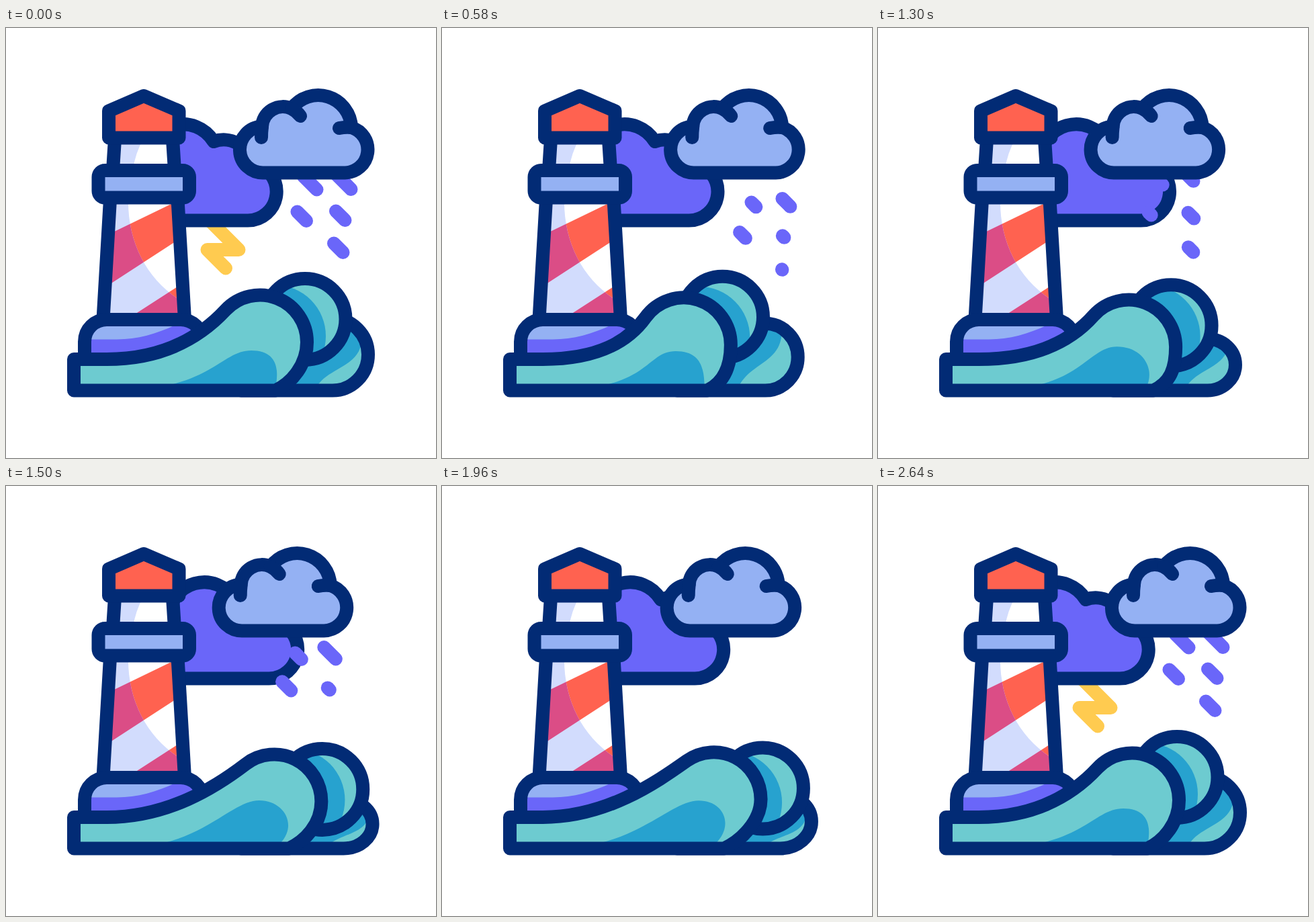
Animation, 640 px wide and 640 px high, one loop 3 s. Source, as an HTML page:

```html
<!DOCTYPE html>
<html lang="en">
<head>
<meta charset="utf-8">
<title>Lighthouse in a storm</title>
<style>
  html, body { margin: 0; width: 100%; height: 100%; overflow: hidden; background: #fff; }
  svg { display: block; width: 100%; height: 100%; }
  .ink { stroke: #022b75; }
  .ink, #bolt, #rain { stroke-width: 20; stroke-linecap: round; stroke-linejoin: round; }
  .line { fill: none; }
  .white { fill: #fff; }
  .sky { fill: #94b1f3; }
  .violet { fill: #6a66f9; }
  .teal { fill: #6dcbd0; }
  .blue { fill: #27a2cf; }
  .red { fill: #ff6250; }
  .pink { fill: #db4d86; }
  .pale { fill: #d2dcfd; }
  #bolt { fill: none; stroke: #ffcb50; }
  #rain { stroke: #6a66f9; }
</style>
</head>
<body>
<svg viewBox="0 0 640 640">
  <defs>
    <clipPath id="shadow"><path d="M182 255C181 320 210 375 262 407V440H140V255Z"/></clipPath>
    <clipPath id="tower"><path d="M155 255H255.5L266 434H144.5Z"/></clipPath>
    <clipPath id="crestClip"><circle r="60.500"/></clipPath>
    <clipPath id="swellClip"><path class="swell"/></clipPath>
    <path id="stripes" d="M156 305.500L252 259V318L152 383ZM184 431L260 382V434H184Z"/>
  </defs>

  <g id="backCloud">
    <path id="bolt" pathLength="1" d="M303 286.500L346.500 330H299.500L327 357.500"/>
    <path id="backBody" class="ink" d="M211 286.500V197A52.700 52.700 0 0 1 309 169A43 43 0 0 1 366 201A43 43 0 0 1 358 286.500Z"/>
  </g>

  <g id="rain"></g>

  <g id="frontCloud" class="ink">
    <path class="sky" d="M384 215.500A34.500 34.500 0 0 1 381 146.500A31 31 0 0 1 425 120A49.400 49.400 0 0 1 514 148A34.500 34.500 0 0 1 504.500 215.500Z"/>
    <path class="line" d="M381 147Q380 155 380 163M425 120Q433 124 438 131M514 148Q505 147 496 149"/>
  </g>

  <g id="lighthouse">
    <path class="white" d="M162 165H248L251 212H159Z"/>
    <path class="pale" d="M204 166Q193 185 189 210H159L162 166Z"/>
    <path class="ink line" d="M162 165L159 212M248 165L251 212"/>
    <path class="ink red" d="M153 123.500L205 101L257.500 123.500V163.500H153Z"/>

    <g clip-path="url(#tower)">
      <path class="white" d="M140 250H270V440H140Z"/>
      <use href="#stripes" class="red"/>
      <g clip-path="url(#shadow)">
        <path class="pale" d="M140 250H270V440H140Z"/>
        <use href="#stripes" class="pink"/>
      </g>
    </g>
    <path class="ink line" d="M155 255L144.500 434M255.500 255L266 434"/>
    <rect class="ink sky" x="137.500" y="212" width="135.500" height="40.500" rx="10"/>

    <path class="sky" d="M117 500V467C117 448 132 434 150 434H260C278 434 293 448 293 467V500Z"/>
    <path class="violet" d="M117 463.500H165C195 463.500 225 455 252 442H280L293 467V500H117Z"/>
    <path class="ink line" d="M117 500V467C117 448 132 434 150 434H260C278 434 293 448 293 467V500"/>
  </g>

  <g id="sea">
    <path class="swell teal"/>
    <path id="swellShade" class="blue" clip-path="url(#swellClip)"/>
    <path class="swell ink line"/>
    <g id="crest">
      <circle class="teal" r="60.500"/>
      <g clip-path="url(#crestClip)"><circle id="crestShade" class="blue" r="76"/></g>
      <circle class="ink line" r="60.500"/>
    </g>
    <path class="wave teal"/>
    <path id="waveShade" class="blue"/>
    <path class="wave ink line"/>
  </g>
</svg>

<script>
const LOOP = 3000;
const $ = id => document.getElementById(id);
const set = (id, attrs) => {
  for (const name in attrs) $(id).setAttribute(name, attrs[name]);
};
const setPath = (name, d) => {
  for (const path of document.querySelectorAll("." + name)) path.setAttribute("d", d);
};
const span = (t, from, length) => Math.min(1, Math.max(0, (t - from) / length));
const ease = x => (1 - Math.cos(Math.PI * x)) / 2;

// Tip of each drop and its length, in the order they fall.
const drops = [
  [501.5, 334, 13.5], [504.5, 286, 13.5], [462.5, 240.5, 20], [513.5, 240, 24], [447, 287, 13.5]
].map(([x, y, size]) => {
  const line = document.createElementNS("http://www.w3.org/2000/svg", "line");
  $("rain").append(line);
  return { x, y, size, line };
});

// Clouds slide 31.5 px, wait, and return.
const drift = (t, back) => 31.5 * (ease(span(t, 200, 1150)) - ease(span(t, back, 930)));

// The sea leans left, rolls over to the right, then settles.
// Returns a blend of the three poses, plus an extra amount in mid-roll.
function seaBlend(t) {
  const left = ease(span(t, 240, 690));
  const right = ease(span(t, 930, 790));
  const x = span(t, 1720, 920);
  const rest = 0.8 * ease(x) + 0.2 * x * (2 - x);
  const roll = Math.sin(Math.PI * right);
  return (a, b, c, extra = 0) => {
    const leaning = a + (b - a) * left + (c - b) * right;
    return leaning + (a - c) * rest + extra * roll;
  };
}

function drawWave(at) {
  const r = 70;
  const x = at(378, 341, 412), y = at(467.5, 475.5, 466, 3.4);
  const angle = at(223, 208, 238) * Math.PI / 180;
  const cos = Math.cos(angle), sin = Math.sin(angle);
  const px = x + r * cos, py = y + r * sin;
  const pull = at(47, 42, 60), end = at(401, 388, 425, 5);
  setPath("wave", `M101 539.5V493H150C${at(240, 225, 245)} 493 ${px + pull * sin} ${py - pull * cos} ${px} ${py}` +
    `A${r} ${r} 0 0 1 ${x + r} ${y}C${x + r} ${y + 33} ${end + 25} 528 ${end} 539.5Z`);

  const foot = at(225, 225, 215), heel = at(401, 380, 405, 8), bulge = at(6, -7, 40);
  const tx = at(365, 330, 387), ty = at(480, 482, 465);
  set("waveShade", {
    d: `M${foot} 535C${foot + 85} 521 ${tx - 38} ${ty} ${tx} ${ty}S${heel + bulge} 507 ${heel} 535Z`
  });
}

function drawCrest(at) {
  set("crest", { transform: `translate(${at(445, 389, 486.5, 3)} ${at(433.5, 427, 454.5, 3.4)})` });
  set("crestShade", { cx: at(-45, -25, -48, 3), cy: at(25, 36, 20, -13) });
}

function drawSwell(at) {
  const x = at(486, 476, 508), rx = at(53, 44, 45, -3), ry = at(53.5, 46, 36.5, -3.4);
  setPath("swell", `M350 539.5H${x}A${rx} ${ry} 0 0 0 ${x} ${539.5 - 2 * ry}H350Z`);
  const top = at(530, 480, 546, 12), foot = at(463, 420, 490, 8), mid = at(505, 492, 523);
  set("swellShade", {
    d: `M${top} ${at(465, 450, 498)}C${top - 5} ${mid} ${foot + 18} ${mid} ${foot} 533V540H350V420H${top}Z`
  });
}

// Drops grow out along a slant, then shrink from the tail while they fall.
function drawRain(t, shift) {
  const second = t > 1000;
  const fall = t < 2000 ? 0.083 * Math.max(0, t - (second ? 1290 : 270)) : 0;
  set("rain", { transform: `translate(${0.49 * fall - shift} ${fall})` });
  drops.forEach(({ x, y, size, line }, i) => {
    let tip = 1, tail = 0;
    if (t > 2000) tip = span(t, 2300 + 35 * i, 200);
    else if (second) {
      tip = span(t, 1120 + 30 * i, 200);
      tail = span(t, 1195 + 75 * i, 300);
    } else tail = span(t, 330 + 40 * i, 260);
    const a = size * (1 - Math.min(tail, tip)), b = size * (1 - tip);
    const ends = { x1: x - a, y1: y - a, x2: x - b, y2: y - b };
    for (const key in ends) line.setAttribute(key, ends[key]);
    line.setAttribute("visibility", tip > 0 && tail < 1 ? "visible" : "hidden");
  });
}

function drawBolt(t) {
  const flash = [820, 1580].find(at => t >= at && t < at + 260);
  let start = 0, end = 1;
  if (flash) {
    end = span(t, flash, 80);
    start = span(t, flash + 180, 80);
  } else if (t < 1200) start = span(t, 220, 120);
  else end = span(t, 2500, 120);
  const size = end - start;
  set("bolt", {
    visibility: size > 0 ? "visible" : "hidden",
    "stroke-dasharray": size >= 1 ? "none" : `${Math.max(0, size)} 2`,
    "stroke-dashoffset": -start
  });
  set("backBody", { fill: flash ? "#ffcb50" : "#6a66f9" });
}

function draw(t) {
  const front = drift(t, 1450);
  set("frontCloud", { transform: `translate(${-front} 0)` });
  set("backCloud", { transform: `translate(${drift(t, 1510)} 0)` });
  drawBolt(t);
  drawRain(t, front);
  const at = seaBlend(t);
  drawSwell(at);
  drawCrest(at);
  drawWave(at);
}

function tick() {
  draw(performance.now() % LOOP);
  requestAnimationFrame(tick);
}
tick();
</script>
</body>
</html>
```
